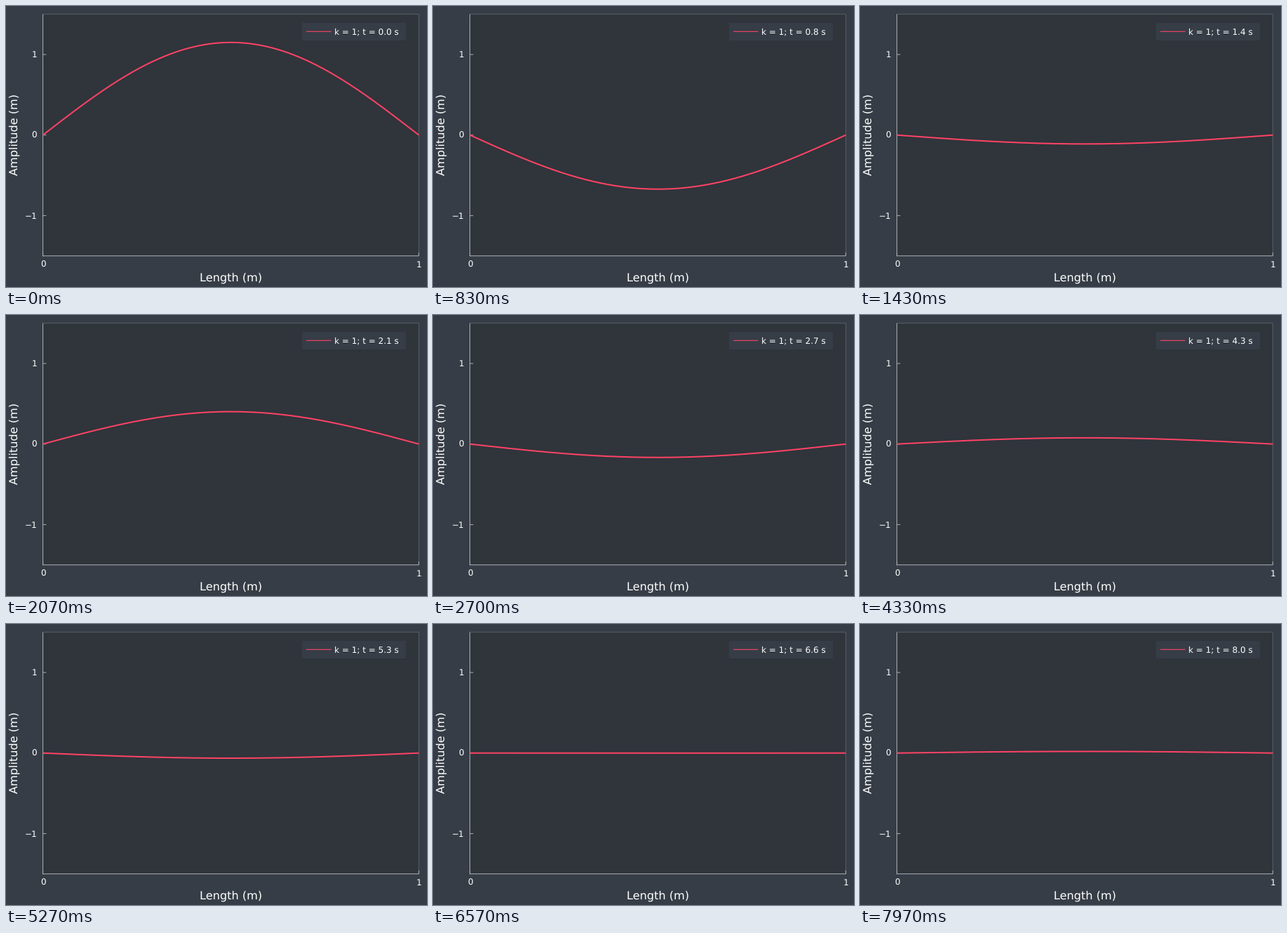
These frames come from a looping animation (600x400 px, 8 s). A matplotlib script:

```python
import numpy as np
import matplotlib.pyplot as plt
from matplotlib.animation import FuncAnimation
from matplotlib.patches import Rectangle

W, H, DPI = 600, 400, 100
LOOP, TICK = 8000, 20  # ms
FPS = 30               # rate at which the string is redrawn
PT = 72 / DPI          # points per pixel

BACK, INSIDE, FRAME, PINK = "#363D46", "#30343B", "#ADB2B7", "#FE4365"
LEFT, RIGHT, TOP, BOTTOM = 52.6, 588.3, 11.7, 355.7
ZERO = (TOP + BOTTOM) / 2
UNIT = (BOTTOM - TOP) / 3

# Damped standing wave: u'' + u' + pi^2 u = 0 for the first mode
DECAY = 0.5
OMEGA = np.sqrt(np.pi**2 - DECAY**2)
COS_AMP, SIN_AMP = 1.15, -0.08

plt.rcParams["font.family"] = "DejaVu Sans"
plt.rcParams["text.hinting"] = "none"

fig = plt.figure(figsize=(W / DPI, H / DPI), dpi=DPI, facecolor=BACK)
ax = fig.add_axes([0, 0, 1, 1])
ax.set_xlim(0, W)
ax.set_ylim(H, 0)
ax.axis("off")


def box(x0, y0, x1, y1, color):
    ax.add_patch(Rectangle((x0, y0), x1 - x0, y1 - y0, fc=color, lw=0, zorder=1))


def line(xs, ys, color=FRAME, width=1.0, zorder=2, **kw):
    return ax.plot(xs, ys, color=color, lw=width * PT, zorder=zorder,
                   snap=False, solid_capstyle="butt", **kw)[0]


def label(x, y, text, size=12, **kw):
    return ax.text(x, y, text, color="white", fontsize=size * PT,
                   va="baseline", zorder=5, **kw)


def amplitude(t):
    swing = COS_AMP * np.cos(OMEGA * t) + SIN_AMP * np.sin(OMEGA * t)
    return np.exp(-DECAY * t) * swing


# Plot area, faint frame and axes
box(LEFT, TOP, RIGHT, BOTTOM, INSIDE)
line([LEFT, RIGHT], [TOP, TOP], alpha=0.3)
line([RIGHT, RIGHT], [TOP, BOTTOM], alpha=0.3)
line([LEFT, LEFT], [TOP, BOTTOM + 0.5])
line([LEFT - 0.5, RIGHT], [BOTTOM, BOTTOM])

# Ticks
for value, text in ((1, "1"), (0, "0"), (-1, "−1")):
    y = ZERO - value * UNIT
    line([LEFT, LEFT + 4.8], [y, y])
    label(44.3, y + 4.4, text, ha="right")
for x, text in ((LEFT, "0"), (RIGHT, "1")):
    line([x, x], [BOTTOM - 4.8, BOTTOM])
    label(x, 372, text, ha="center")

label(320.3, 392, "Length (m)", 16.1, ha="center")
label(17, ZERO - 1.2, "Amplitude (m)", 16.1, ha="center",
      rotation=90, rotation_mode="anchor")

# Legend
box(422, 23.7, 570.3, 48.8, BACK)
line([428, 463.5], [36.3, 36.3], PINK, 1.1, zorder=4)
caption = label(468, 41, "")

# String
u = np.linspace(0, 1, 201)
shape = np.sin(np.pi * u)
string = line(LEFT + u * (RIGHT - LEFT), ZERO + 0 * u, PINK, 2, zorder=3)


def draw(i):
    t = round(i * TICK * FPS / 1000) / FPS
    string.set_ydata(ZERO - UNIT * amplitude(t) * shape)
    caption.set_text(f"k = 1; t = {t:.1f} s")
    return string, caption


anim = FuncAnimation(fig, draw, frames=LOOP // TICK, init_func=lambda: draw(0),
                     interval=TICK, repeat=True, repeat_delay=0)
plt.show()
```
